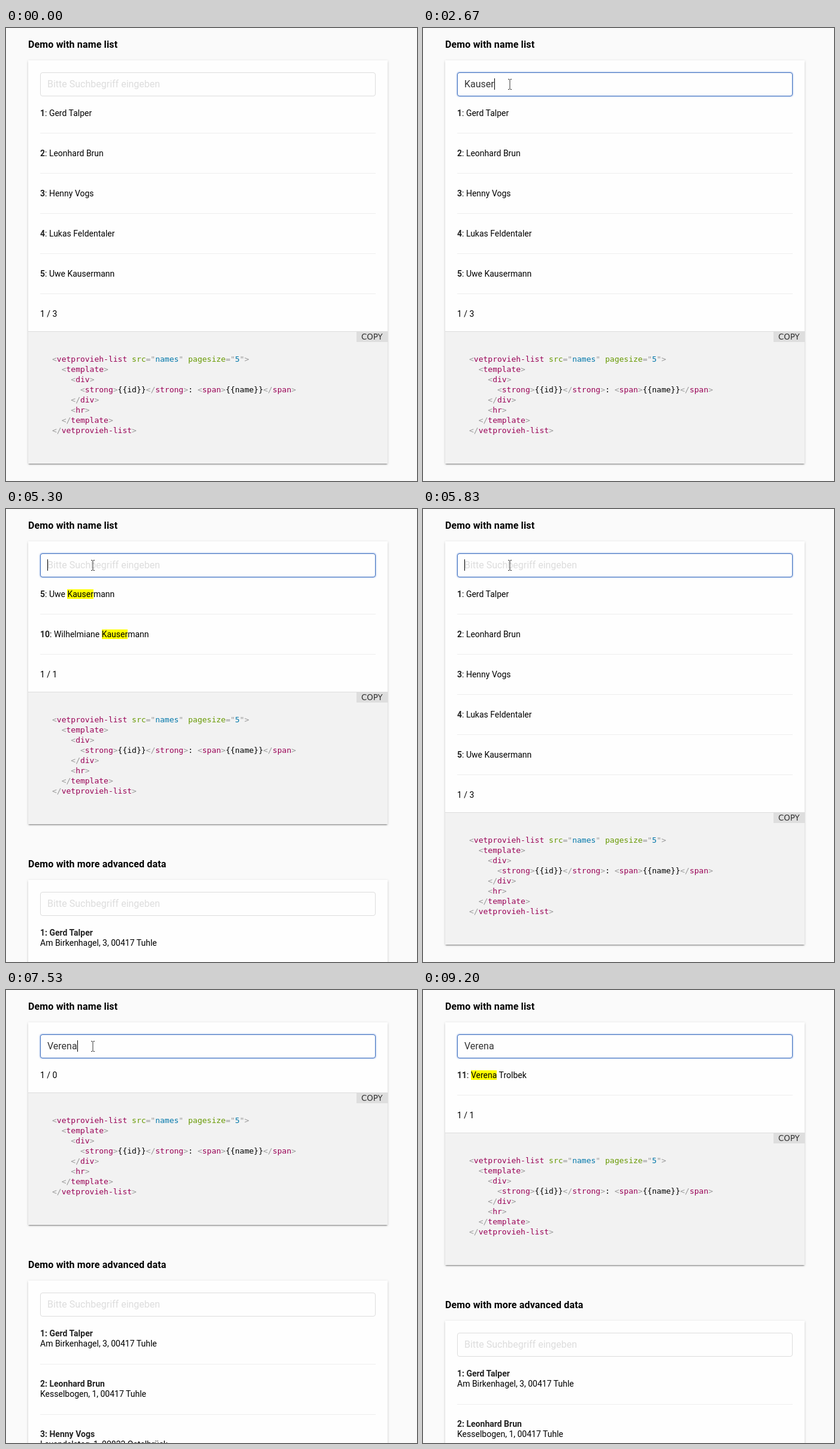
An HTML page that plays this animation: 686 px wide and 756 px high, repeating every 9310 ms.

```html
<!DOCTYPE html>
<html lang="de">
<head>
<meta charset="utf-8">
<title>Name list demo</title>
<style>
  html, body { margin: 0; width: 100%; height: 100%; overflow: hidden; }
  #stage {
    position: relative; width: 686px; height: 756px; overflow: hidden;
    background: #fafafa; color: #000; font: 14px/16px Roboto, sans-serif; white-space: pre;
  }
  #stage div { position: absolute; box-sizing: border-box; }
  #stage [hidden] { display: none; }
  .title { left: 37px; top: 18px; font: bold 16px/19px Roboto, sans-serif; letter-spacing: .15px; }
  .card {
    left: 37px; top: 54px; width: 600px; background: #fefefe;
    box-shadow: 0 2px 2px -1px rgba(0, 0, 0, .45), 0 1px 4px rgba(0, 0, 0, .16);
  }
  .field {
    left: 57px; top: 74px; width: 560px; height: 40px; background: #fefefe;
    border: 1px solid #ddd; border-radius: 4px;
  }
  .field.focus { border-color: #4070c0; box-shadow: 0 0 2px 1px rgba(130, 165, 225, .6); }
  .entry { left: 69px; top: 84px; font-size: 16px; line-height: 19px; color: #333; }
  .hint { color: #ddd; }
  .selected { background: #4a90d9; color: #fff; }
  #caret { left: 69px; top: 84px; width: 1px; height: 19px; background: #000; }
  .list, #lower { left: 0; top: 0; }
  .row { left: 57px; }
  b { color: #222; }
  mark { background: #ff0; color: inherit; }
  .rule { left: 57px; width: 560px; height: 1px; background: #eee; }
  #code {
    left: 37px; top: 0; width: 600px; height: 221px; padding: 37px 0 0 40px;
    background: #f2f2f2; border-top: 1px solid #ddd;
    font: 13px/17px "DejaVu Sans Mono", monospace;
  }
  #code i { font-style: normal; color: #999; }
  #code u { text-decoration: none; color: #905; }
  #code s { text-decoration: none; color: #690; }
  #code q { quotes: none; color: #07a; }
  #copy {
    left: 585px; top: 1px; width: 52px; height: 17px; padding: 1px 0 0 8px;
    background: #dedede; color: #333; font: 13.333px/15px "DejaVu Sans", sans-serif;
  }
  #popup {
    left: 57px; top: 113px; width: 560px; height: 124px; padding: 2px 0 0 6px;
    background: #fefefe; border: 1px solid #ccc; overflow: hidden;
    font: 13.333px/20px "DejaVu Sans", sans-serif;
  }
  #track { left: 545px; top: 1px; width: 12px; height: 120px; background: #cecece; }
  #thumb { left: 3px; top: 3px; width: 6px; height: 94px; border-radius: 3px; background: #7e7e7e; }
  #pointer { position: absolute; left: 0; top: 0; overflow: visible; }
</style>
</head>
<body>
<div id="stage"></div>
<script>
const LOOP = 9310;
const HINT = 'Bitte Suchbegriff eingeben';

const names = {
  1: 'Gerd Talper', 2: 'Leonhard Brun', 3: 'Henny Vogs', 4: 'Lukas Feldentaler',
  5: 'Uwe Kausermann', 10: 'Wilhelmiane Kausermann', 11: 'Verena Trolbek'
};
const streets = [
  'Am Birkenhagel, 3, 00417 Tuhle',
  'Kesselbogen, 1, 00417 Tuhle',
  'Lavendelsteg, 1, 00823 Ostelbrück'
];
const history = ['LR_Kennung', 'MoorFileHandler', 'nolu', 'li', 'LI', 'LJK'];

const lists = {
  all: { ids: [1, 2, 3, 4, 5], pages: 3 },
  pair: { ids: [5, 10], find: 'Kauser', pages: 1 },
  none: { ids: [], pages: 0 },
  one: { ids: [11], find: 'Verena', pages: 1 }
};

// [time, value] steps
const typing = [
  [0, ''], [2000, 'K'], [2130, 'Ka'], [2250, 'Kau'], [2350, 'Kaus'], [2430, 'Kause'], [2620, 'Kauser'],
  [5300, ''], [5950, 'V'], [6100, 'Ve'], [6250, 'Ver'], [6450, 'Vern'],
  [7100, 'Ver'], [7180, 'Vere'], [7280, 'Veren'], [7380, 'Verena']
];
const results = [[0, 'all'], [2850, 'pair'], [5690, 'all'], [7070, 'none'], [7880, 'one']];
const FOCUS = 970, SELECT = 4530, CLEAR = 5300, CARET = 550;

const at = (steps, t) => steps.filter(s => s[0] <= t).pop();
const $ = id => document.getElementById(id);
const box = (cls, top, html = '') => `<div class="${cls}" style="top:${top}px">${html}</div>`;

function listHtml(key) {
  const { ids, find, pages } = lists[key];
  const rows = ids.map((id, i) => {
    const name = find ? names[id].replace(find, `<mark>${find}</mark>`) : names[id];
    return box('row', 134 + 67 * i, `<b>${id}</b>: ${name}`) + box('rule', 175 + 67 * i);
  });
  const pager = box('row', 134 + 67 * ids.length, `1 / ${pages}`);
  return `<div class="list" id="${key}">${rows.join('')}${pager}</div>`;
}

function codeHtml() {
  const open = (n, attrs = '') => `<i>&lt;</i><u>${n}</u>${attrs}<i>&gt;</i>`;
  const close = n => `<i>&lt;/</i><u>${n}</u><i>&gt;</i>`;
  const attr = (k, v) => ` <s>${k}</s><i>="</i><q>${v}</q><i>"</i>`;
  return [
    open('vetprovieh-list', attr('src', 'names') + attr('pagesize', 5)),
    '  ' + open('template'),
    '    ' + open('div'),
    `      ${open('strong')}{{id}}${close('strong')}: ${open('span')}{{name}}${close('span')}`,
    '    ' + close('div'),
    '    ' + open('hr'),
    '  ' + close('template'),
    close('vetprovieh-list')
  ].join('\n');
}

const people = streets.map((street, i) =>
  box('row', 134 + 84 * i, `<b>${i + 1}: ${names[i + 1]}</b>`) +
  box('row', 151 + 84 * i, street) + box('rule', 193 + 84 * i)).join('');

$('stage').innerHTML = `
  <div class="title">Demo with name list</div>
  <div class="card" id="card"></div>
  <div class="field" id="field"></div>
  <div class="entry"><span id="entry"></span></div>
  <div id="caret"></div>
  ${Object.keys(lists).map(listHtml).join('')}
  <div id="lower">
    <div id="code">${codeHtml()}</div>
    <div id="copy">COPY</div>
    <div style="left:0;top:260px">
      <div class="title">Demo with more advanced data</div>
      <div class="card" style="height:673px"></div>
      <div class="field"></div>
      <div class="entry hint">${HINT}</div>
      ${people}
    </div>
  </div>
  <div id="popup">${history.join('\n')}<div id="track"><div id="thumb"></div></div></div>
  <svg id="pointer" width="1" height="1">
    <path id="arrow" d="M0 0V17L4 13.5L6.5 18.5L9.5 17L7.5 12.5L11.5 11Z" fill="#404040" stroke="#fff" stroke-width=".5"/>
    <path id="beam" d="M-3 -8.5H-1L0 -7.5L1 -8.5H3M0 -7.5V7.5M-3 8.5H-1L0 7.5L1 8.5H3" fill="none" stroke="#333"/>
  </svg>`;

const ease = k => k * k * (3 - 2 * k);

function pointerAt(t) {
  const mix = (a, b, k) => a + (b - a) * ease(Math.min(1, Math.max(0, k)));
  if (t < 4000) {
    const k = (t - 400) / 500;
    return [mix(75, 145, k), mix(715, 94, k), t >= 400];
  }
  const k = (t - 8560) / 600;
  return [mix(145, -14, k), mix(94, 725, k), t < 9170];
}

function render(t) {
  const [keyTime, text] = at(typing, t);
  const key = at(results, t)[1];
  const focused = t >= FOCUS;
  const selecting = t >= SELECT && t < CLEAR;
  const popup = focused && t < 2000;

  $('field').classList.toggle('focus', focused);
  const entry = $('entry');
  entry.textContent = text || HINT;
  entry.className = !text ? 'hint' : selecting ? 'selected' : '';

  const caret = $('caret');
  caret.hidden = !focused || selecting || t - Math.max(keyTime, FOCUS) >= CARET;
  caret.style.left = 69 + (text ? Math.round(entry.getBoundingClientRect().width) : 0) + 'px';

  for (const k in lists) $(k).hidden = k !== key;
  const top = 171 + 67 * lists[key].ids.length;
  $('lower').style.top = top + 'px';
  $('card').style.height = top + 167 + 'px';
  $('popup').hidden = !popup;

  const [x, y, shown] = pointerAt(t);
  const overField = !popup && x > 57 && y > 74 && y < 114;
  $('pointer').style.display = shown ? '' : 'none';
  $('pointer').style.transform = `translate(${x}px, ${y}px)`;
  $('arrow').style.display = overField ? 'none' : '';
  $('beam').style.display = overField ? '' : 'none';
}

const start = performance.now();
function tick() {
  render((performance.now() - start) % LOOP);
  requestAnimationFrame(tick);
}
tick();
</script>
</body>
</html>
```
